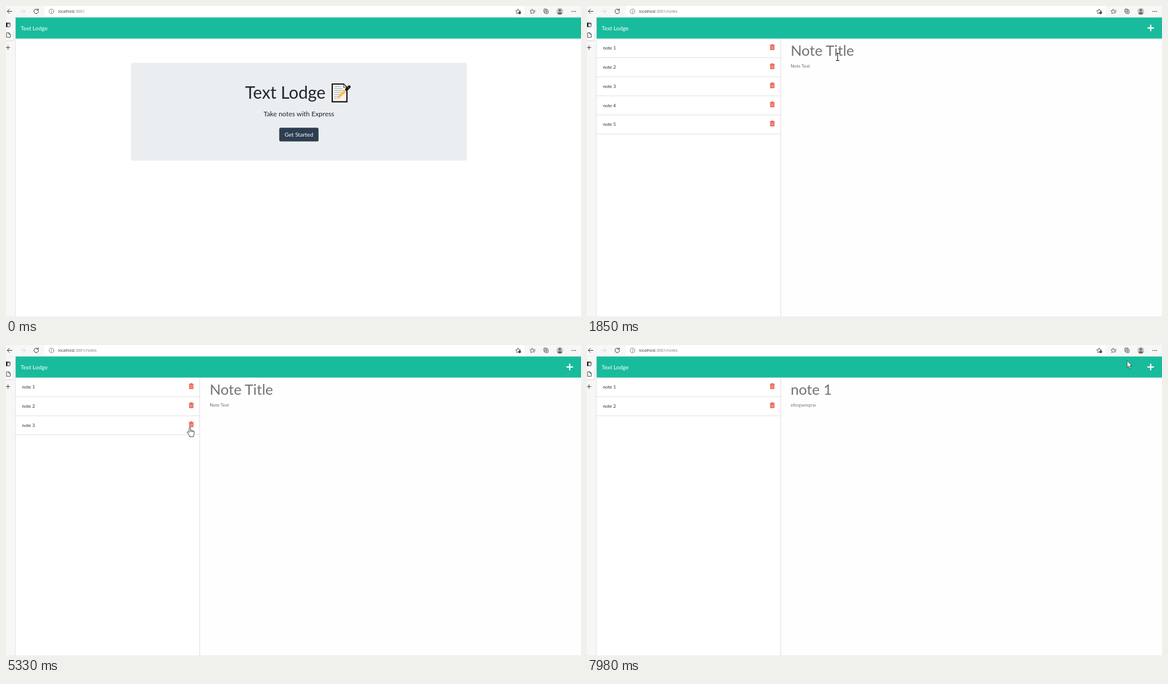
Animation, 1017 px wide and 550 px high, one loop 8000 ms. Source, as an HTML page:

```html
<!DOCTYPE html>
<html lang="en">
<head>
<meta charset="utf-8">
<title>Notes demo</title>
<style>
  html, body { margin: 0; width: 100%; height: 100%; overflow: hidden; background: #fff; }
  svg { display: block; width: 100%; height: 100%; }
  text { font-family: Lato, sans-serif; fill: #212529; white-space: pre; }
  .url { font: 7px "Open Sans", sans-serif; fill: #333; }
  .dim { fill: #777; }
  .ink { fill: none; stroke: #333; stroke-width: 1; stroke-linecap: round; stroke-linejoin: round; }
  .brand { font-size: 10.03px; fill: #fff; }
  .row { font-size: 8.03px; fill: #2b2b2b; }
  .field { fill: #727272; }
</style>
</head>
<body>
<svg viewBox="0 0 1017 550" preserveAspectRatio="none">
  <defs>
    <g id="trash" fill="#e74c3c">
      <path d="M0 1.2h2.4l.6-1h2.6l.6 1h2.4v1.2H0z"/>
      <path fill-rule="evenodd" d="M.6 3h7.4v6.4q0 .8-.8.8H1.4q-.8 0-.8-.8zM2.1 4.2v4.8h.7V4.2zM4 4.2v4.8h.7V4.2zM5.9 4.2v4.8h.7V4.2z"/>
    </g>
  </defs>
  <rect width="1017" height="550" fill="#fff"/>

  <g id="home">
    <rect x="221" y="100.5" width="594" height="173" rx="2.5" fill="#ebeef0"/>
    <text x="423" y="164" font-size="29.96">Text Lodge</text>
    <g id="memo">
      <path d="M577 138h20l6 6v25.3h-26z" fill="#f4f4f4" stroke="#111" stroke-width="2.2"/>
      <path d="M597 138v6h6z" fill="#ddd" stroke="#111" stroke-width=".8"/>
      <path d="M580.5 142.5h12M580.5 146h15M580.5 149.5h18M580.5 153h14M580.5 156.5h10M580.5 160h7M580.5 163.5h4" stroke="#a5a5a5" stroke-width="1"/>
      <path d="M588 162l17-17" stroke="#f6c343" stroke-width="4"/>
      <path d="M602.5 147.5l4.5-4.5" stroke="#111" stroke-width="5.2" stroke-linecap="round"/>
      <path d="M604.2 145.7l2-2" stroke="#555" stroke-width="2.4"/>
      <path d="M586.6 160.6l2.8 2.8-4.4 1.7z" fill="#e9c99a"/>
    </g>
    <text x="518" y="195" font-size="11.95" text-anchor="middle">Take notes with Express</text>
    <rect id="ring" x="482.2" y="214.2" width="71.6" height="26.4" rx="3.4" fill="#9ba5af"/>
    <rect id="button" x="483.3" y="215.2" width="69.5" height="24.4" rx="2.5"/>
    <text x="518" y="231" class="brand" text-anchor="middle">Get Started</text>
  </g>

  <g id="notes">
    <rect x="343" y="58" width="674" height="492" fill="#fefefe"/>
    <g id="rows"></g>
    <path d="M342.7 58V550" stroke="#dcdcdc"/>
    <text id="title" class="field" x="360.2" y="87.5" font-size="25.7"></text>
    <text id="body" class="field" x="360.2" y="108.5" font-size="8.03"></text>
    <path id="caret" d="M360.6 65V91.5" stroke="#222"/>
  </g>

  <rect y="20" x="17" width="1000" height="37.6" fill="#18bc9c"/>
  <text x="26" y="42.7" class="brand">Text Lodge</text>
  <path id="plus" d="M991.2 38.8h11.6M997 33v11.6" stroke="#fff" stroke-width="2.3"/>

  <g id="chrome">
    <rect width="1017" height="20.3" fill="#f7f7f7"/>
    <rect x="68" y="-4" width="849" height="22.2" rx="2.5" fill="#fff"/>
    <rect y="20" width="16.5" height="530" fill="#f7f7f7"/>
    <path d="M16.7 20V550" stroke="#d8d8d8" stroke-width=".8"/>
    <path d="M0 20.2H17" stroke="#e6e6e6" stroke-width=".6"/>
    <path d="M0 549.5H1017" stroke="#ececec"/>
    <path id="status" d="M0 549.5H82" stroke="#fff"/>
    <rect x="-4" y="43.2" width="17.5" height="19" rx="2" fill="#e2e2e2"/>
    <rect x="-4" y="42" width="16.4" height="18.4" rx="1.5" fill="#fff"/>
    <g class="ink">
      <path d="M10.6 9.5H2.4M6 5.8L2.3 9.5L6 13.2"/>
      <path d="M25.5 9.5h8.2M30.2 5.8l3.7 3.7-3.7 3.7" stroke="#d5d5d5"/>
      <path id="reload" d="M56.8 7.2A4 4 0 1 0 57.5 9.6M57.2 5v2.6h-2.6"/>
      <path id="stop" d="M50.3 6.3l6.4 6.4M56.7 6.3l-6.4 6.4"/>
      <g stroke="#666" stroke-width=".8"><circle cx="80.5" cy="9.6" r="4.2"/><path d="M80.5 9.2v2.6M80.5 7.4v.2"/></g>
      <g stroke="#444" stroke-width=".85">
        <path id="star" d="M905.7 5.4l1.3 2.8 3.1.4-2.3 2.1.5 3-2.6-1.4-2.6 1.4.5-3-2.3-2.1 3.1-.4z"/>
        <circle cx="908.5" cy="12" r="2" fill="#444"/>
        <path d="M933 8.2h-1.2l-1.2-2.8-1.3 2.8-2.6.4 2 2-.5 3 2.3-1.4M933 8.2h3M932.5 10.4h3.2M931.8 12.5h2.6"/>
        <rect x="951.2" y="5.4" width="5.8" height="6" rx="1"/>
        <rect x="953" y="7.3" width="6" height="6.2" rx="1" fill="#f7f7f7"/>
        <path d="M956 8.8v3.2M954.4 10.4h3.2"/>
      </g>
      <path d="M0 29.8h5.8q1.4 0 1.4 1.4v4.2q0 1.4-1.4 1.4H0M0 31.2h7"/>
      <path id="doc" d="M1.5 47.2h3.4l2.6 2.6v5.6h-6zM4.9 47.2v2.6h2.6" stroke-width=".9"/>
      <path d="M0 73.5h7M3.5 70v7" stroke-width=".9"/>
    </g>
    <rect y="30" width="2.5" height="7" fill="#222"/>
    <circle cx="979.5" cy="9.5" r="6" fill="#c9c7c5"/>
    <circle cx="979.5" cy="7.6" r="2.3" fill="#6f6d6b"/>
    <path d="M975.4 13.8q0-3 4.1-3t4.1 3q-4.1 3-8.2 0z" fill="#6f6d6b"/>
    <g fill="#333"><circle cx="1001.2" cy="9.6" r=".85"/><circle cx="1004.2" cy="9.6" r=".85"/><circle cx="1007.2" cy="9.6" r=".85"/></g>
    <text x="92" y="12.2" class="url">localhost<tspan class="dim" id="path"></tspan></text>
  </g>

  <g id="cursor">
    <path id="arrow" d="M0 0V12.2L2.8 9.6L4.7 14L6.7 13.1L4.9 8.9H8.4z" fill="#fff" stroke="#333" stroke-width=".8"/>
    <g id="beam" fill="none">
      <path d="M-3 -6.4h2.3l.7.7.7-.7H3M0 -5.7V5.7M-3 6.4h2.3l.7-.7.7.7H3" stroke="#fff" stroke-width="2.4"/>
      <path d="M-3 -6.4h2.3l.7.7.7-.7H3M0 -5.7V5.7M-3 6.4h2.3l.7-.7.7.7H3" stroke="#222" stroke-width="1.2"/>
    </g>
    <path id="hand" d="M-1.3 1.2Q-1.2 0 0 0T1.3 1.2V5.2Q2.4 4.4 3.5 5.5Q4.8 4.9 5.6 6.1Q7.6 5.8 7.6 7.8V10.8Q7.4 13 6.2 14.2V16.2H-.4V14.8Q-2 13.2-3 11L-4.8 8.8Q-5.2 7.4-3.8 7.2Q-2.6 7.4-1.3 9zM1.3 5.2V7.6M3.5 5.5V7.9M5.6 6.1V8.2" fill="#fff" stroke="#333" stroke-width=".95" stroke-linejoin="round"/>
  </g>
</svg>
<script>
const LOOP = 8000, ROW_TOP = 57.6, ROW_H = 33.75, ROWS = 5;
const NAVIGATE = 1230, LOADED = 1330;
const $ = id => document.getElementById(id);
const show = (id, on) => $(id).setAttribute('visibility', on ? 'visible' : 'hidden');

// Pointer hot spot: time, x, y
const track = [
  [90, 1011, 539], [450, 750, 335], [700, 565, 226], [850, 503, 196],
  [900, 509, 222], [1080, 513, 230], [1380, 513, 231],
  [1670, 446, 117], [1850, 443.2, 90], [2050, 443.2, 90], [2100, 442, 89],
  [2680, 442, 89], [2950, 365, 165], [3190, 323.5, 203.5],
  [3900, 323.5, 203.5], [4350, 326, 189], [4720, 325, 170],
  [5000, 325, 170], [5330, 325.2, 146], [5430, 325.2, 142],
  [5650, 325, 143], [5950, 235, 128], [6290, 128.5, 112],
  [6680, 128.5, 112], [6880, 130, 76], [7040, 130, 76], [7110, 130, 72.5],
  [7270, 130, 72.5], [7430, 225, 92], [7620, 490, 98], [7800, 770, 62], [7980, 955.3, 27.7]
];

function pointerAt(t) {
  const i = track.findIndex(k => k[0] > t);
  if (i < 0) return track[track.length - 1].slice(1);
  if (i === 0) return track[0].slice(1);
  const [a, b] = [track[i - 1], track[i]];
  const u = (t - a[0]) / (b[0] - a[0]);
  return [a[1] + (b[1] - a[1]) * u, a[2] + (b[2] - a[2]) * u];
}

function shapeAt(t, x, y, count) {
  if (t < NAVIGATE) {
    if (t >= 1130) return 'beam';
    if (t >= 900) return 'hand';
    return x > 456 && x < 581 && y > 182 && y < 200 ? 'beam' : 'arrow';
  }
  if (y < 58) return 'arrow';
  if (x > 343) return 'beam';
  return y < ROW_TOP + count * ROW_H ? 'hand' : 'arrow';
}

function noteCount(t) {
  if (t < LOADED) return 0;
  return ROWS - [3480, 4820, 5620].filter(at => t >= at).length;
}

$('rows').innerHTML = Array.from({ length: ROWS }, (_, i) => {
  const y = ROW_TOP + i * ROW_H;
  return `<g><text class="row" x="28.3" y="${y + 19.8}">note ${i + 1}</text>
    <use href="#trash" x="323.4" y="${y + 10}"/>
    <path d="M17 ${y + ROW_H}H342.5" stroke="#dfdfdf"/></g>`;
}).join('');

function draw(t) {
  const onNotes = t >= NAVIGATE, count = noteCount(t);
  const loading = t >= 1080 && t < 1430;
  $('home').style.display = onNotes ? 'none' : '';
  $('notes').style.display = onNotes ? '' : 'none';
  show('plus', onNotes);
  show('reload', !loading);
  show('stop', loading);
  show('doc', !loading);
  show('status', t >= 900 && t < 1330);
  show('ring', t >= 1050);
  $('button').setAttribute('fill', t < 900 ? '#2c3e50' : t < 1050 ? '#1e2b37' : '#1a252f');
  $('path').textContent = onNotes ? ':3001/notes' : ':3001';

  [...$('rows').children].forEach((row, i) => { row.style.display = i < count ? '' : 'none'; });
  const [title, body] = t < 6490 ? ['Note Title', 'Note Text']
    : t < 7260 ? ['note 2', 'bfdabfdb'] : ['note 1', 'efergwregrw'];
  $('title').textContent = title;
  $('body').textContent = body;
  $('caret').style.display = t >= 1950 && t < 3540 && Math.floor((t - 1950) / 530) % 2 === 0 ? '' : 'none';

  const [x, y] = pointerAt(t), shape = shapeAt(t, x, y, count);
  $('cursor').style.display = t < 90 ? 'none' : '';
  $('cursor').setAttribute('transform', `translate(${x.toFixed(2)} ${y.toFixed(2)})`);
  for (const id of ['arrow', 'beam', 'hand']) show(id, id === shape);
}

const start = performance.now();
function tick() {
  draw((performance.now() - start) % LOOP);
  requestAnimationFrame(tick);
}
draw(0);
requestAnimationFrame(tick);
</script>
</body>
</html>
```
